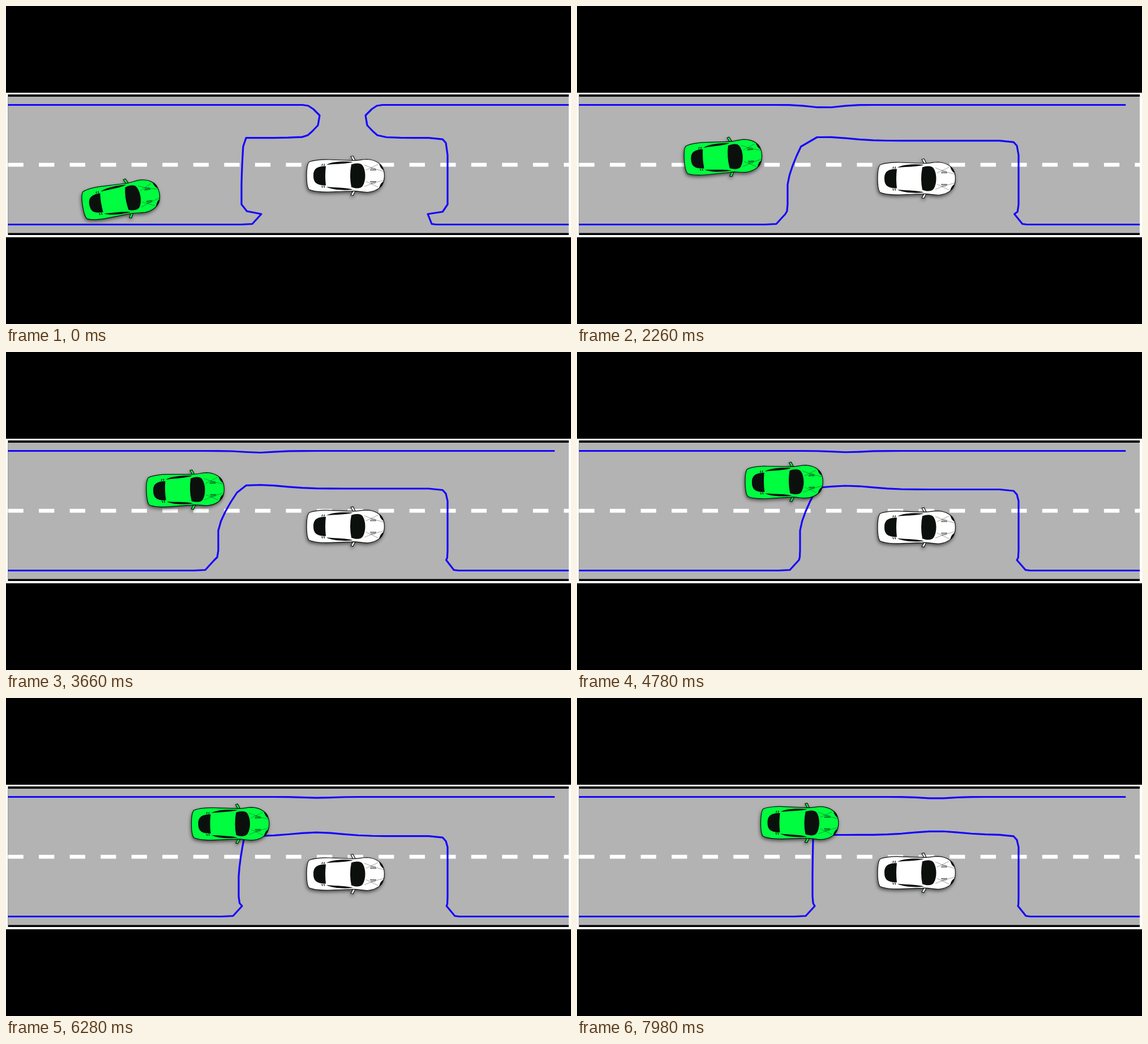
Write an HTML page with a canvas that moves like this. It is 998 px wide and 561 px high and loops after 8000 ms.

```html
<!DOCTYPE html>
<html lang="en">
<head>
<meta charset="utf-8">
<title>Overtaking</title>
<style>
html, body { margin: 0; width: 100%; height: 100%; overflow: hidden; background: #000; }
canvas { display: block; }
</style>
</head>
<body>
<canvas id="stage" width="998" height="561"></canvas>
<script>
const ctx = document.getElementById('stage').getContext('2d');
const LOOP = 8000;
const BLUE = '#1606fb';
const KEYS = [0, 26, 49, 79, 103, 134, 171];
const ROAD_TOP = 174.5, ROAD_BOTTOM = 385.5, ROAD_LEFT = 3.5, ROAD_RIGHT = 994;

// Smooth curve through a few values at uneven steps.
function curve(values, steps = KEYS) {
  const last = steps.length - 1;
  const slope = i => {
    const a = Math.max(i - 1, 0), b = Math.min(i + 1, last);
    return (values[b] - values[a]) / (steps[b] - steps[a]);
  };
  return n => {
    if (n >= steps[last]) return values[last];
    const i = steps.findIndex(s => s > n) - 1;
    const h = steps[i + 1] - steps[i], u = (n - steps[i]) / h, v = 1 - u;
    return v * v * (1 + 2 * u) * values[i] + u * u * (3 - 2 * u) * values[i + 1]
      + h * u * v * (v * slope(i) - u * slope(i + 1));
  };
}
const bell = (x, center, width) => Math.exp(-(((x - center) / width) ** 2));

const greenX = curve([203.5, 211.5, 258.3, 317, 366, 396.5, 402, 393.5], [0, 26, 49, 79, 103, 134, 152, 171]);
const greenY = curve([341.5, 296.7, 267, 243.3, 229.4, 222, 220.3]);
const greenAngle = n => 1.5 - 10.5 * Math.exp(-n / 75);
const whiteY = curve([299.5, 301.5, 304.5, 307.8, 309.3, 310.5, 308.3]);

// The boundary opens in a gap above the white car, which closes and leaves a bump.
const MERGE = 38;
const gapWidth = n => 81 * (1 - (n / MERGE) ** 1.55);
const gapX = curve([594.5, 489, 437, 447, 477, 549, 635]);
const leftFoot = curve([435, 382, 352, 352, 376, 401, 404]);
const leftWall = curve([416, 398, 372, 375, 394, 411, 416]);
const rightElbow = curve([745, 733, 771, 777, 779], [0, 26, 46, 103, 171]);
const RIGHT_WALL = 780;

function leftSide(n) {
  const foot = leftFoot(n), wall = leftWall(n), elbow = foot + 16;
  const lean = 33 * bell(n, 78, 50);
  const points = [[ROAD_LEFT, ROAD_BOTTOM], [foot - 20, ROAD_BOTTOM], [foot, 384.5], [elbow, 367],
    [wall + 0.27 * (elbow - wall), 362], [wall, 350]];
  for (let y = 315; y > 246; y -= 16.75) points.push([wall + lean * ((315 - y) / 67) ** 1.4, y]);
  return points;
}

function crest(n) {
  const points = [];
  for (let i = 0; i <= 14; i++) {
    const x = 424 + 24.8 * i;
    points.push([x, whiteY(n) - 66.8 - 6.5 * bell(x, gapX(n), 60) + (i === 14 ? 2.5 : 0)]);
  }
  return points;
}

function rightSide(n) {
  const elbow = rightElbow(n), foot = 793 - 41 * Math.exp(-n / 26);
  return [[777, whiteY(n) - 58], [RIGHT_WALL, 263], [RIGHT_WALL, 350],
    [RIGHT_WALL + 0.25 * (elbow - RIGHT_WALL), 363], [elbow, 367], [foot, 384.5],
    [foot + 8, ROAD_BOTTOM], [ROAD_RIGHT, ROAD_BOTTOM]];
}

// Rounded end beside the gap, from top to bottom; side is -1 on the left.
function gapEnd(n, side) {
  const tip = gapX(n) + side * gapWidth(n) / 2;
  const stretch = 1 + n * (side < 0 ? 0.025 : 0.045);
  return [[30, ROAD_TOP], [20, 176], [11, 182], [0, 193], [3, 210.5], [13, 221], [21, 228]]
    .map(([dx, y]) => [tip + side * dx * (y < 193 ? stretch : 1), y]);
}

function polyline(points) {
  ctx.beginPath();
  points.forEach(([x, y]) => ctx.lineTo(x, y));
  ctx.stroke();
}

function drawBoundary(n) {
  ctx.strokeStyle = BLUE;
  ctx.lineWidth = 3.2;
  ctx.lineJoin = 'round';
  if (n < MERGE) {
    const a = gapEnd(n, -1), b = gapEnd(n, 1);
    polyline([...leftSide(n), ...crest(n).filter(p => p[0] < a[6][0] - 4), ...a.reverse(), [ROAD_LEFT, ROAD_TOP]]);
    polyline([[ROAD_RIGHT, ROAD_TOP], ...b, ...crest(n).filter(p => p[0] > b[6][0] + 4), ...rightSide(n)]);
  } else {
    const depth = 1.4 + (311 - whiteY(n)) * 0.5 + 6 * Math.exp((MERGE - n) / 3);
    const top = [];
    for (let x = ROAD_LEFT; x <= ROAD_RIGHT; x += 24.7625) top.push([x, ROAD_TOP + depth * bell(x, gapX(n), 35)]);
    polyline(top);
    polyline([...leftSide(n), ...crest(n), ...rightSide(n)]);
  }
}

const body = new Path2D(`M-69 0C-69 -12 -68 -20 -65 -24C-57 -28 -40 -29 -30 -28.5L10 -27
  C21 -26 27 -29 38 -29C52 -28 60 -23 65 -15C69.5 -6 69.5 6 65 15C60 23 52 28 38 29
  C27 29 21 26 10 27L-30 28.5C-40 29 -57 28 -65 24C-68 20 -69 12 -69 0Z`);
const rearWindow = new Path2D('M-35 -17C-51 -17 -57 -12 -57 0S-51 17 -35 17Q-37 0 -35 -17Z');
const windshield = new Path2D('M10 -20C18 -23 27 -23 30 -18C36 -9 36 9 30 18C27 23 18 23 10 20Q6 0 10 -20Z');
// Parts of one side, mirrored for the other.
const mirror = new Path2D('M13 -27L9 -34L13 -35L17 -27Z');
const sideWindow = new Path2D('M-34 -19.5C-24 -25 -4 -26 13 -24.5C4 -21 -16 -21 -34 -19.5Z');
const headlight = new Path2D('M59 -22Q66 -18 66.5 -10Q61 -13 59 -22Z');
const rearVents = new Path2D('M-42 -17.5L-41 -21M-38.5 -17.5L-37.5 -21');
const hoodLines = new Path2D('M33 -19Q50 -11 67 -8M36 -10L57 -20');
const hoodVents = new Path2D('M44 -10L46 -14M46.5 -10L48.5 -14M49 -10L51 -14M51.5 -10L53 -13M43 -10H54');

function bothSides(draw) {
  for (let side = 0; side < 2; side++) {
    ctx.scale(1, -1);
    draw();
  }
}

function drawCar(x, y, angle, color) {
  ctx.save();
  ctx.translate(x, y);
  ctx.rotate(angle * Math.PI / 180);
  ctx.fillStyle = color;
  ctx.strokeStyle = '#111';
  ctx.lineWidth = 1.2;
  ctx.shadowColor = 'rgba(0,0,0,.65)';
  ctx.shadowBlur = 6;
  ctx.shadowOffsetX = -1;
  ctx.shadowOffsetY = 3;
  bothSides(() => ctx.fill(mirror));
  ctx.fill(body);
  ctx.shadowColor = 'transparent';
  bothSides(() => {
    ctx.fill(mirror);
    ctx.stroke(mirror);
  });
  ctx.fill(body);
  ctx.stroke(body);

  ctx.fillStyle = '#0c100d';
  ctx.fill(rearWindow);
  ctx.fill(windshield);
  bothSides(() => {
    ctx.fill(sideWindow);
    ctx.fill(headlight);
    ctx.lineWidth = 1.3;
    ctx.stroke(rearVents);
    ctx.lineWidth = 0.4;
    ctx.stroke(hoodLines);
    ctx.lineWidth = 0.7;
    ctx.stroke(hoodVents);
  });
  ctx.restore();
}

function drawRoad() {
  const box = (color, x, y, w, h) => { ctx.fillStyle = color; ctx.fillRect(x, y, w, h); };
  const width = ROAD_RIGHT - ROAD_LEFT;
  box('#000', 0, 0, 998, 561);
  box('#fff', 0, 153, 998, 255);
  box('#000', ROAD_LEFT, 156, width, 248);
  box('#b3b3b3', ROAD_LEFT, 160, width, 240.5);
  for (let x = ROAD_LEFT; x < ROAD_RIGHT; x += 54.55) {
    box('#fff', x, 276.7, Math.min(27.3, ROAD_RIGHT - x), 6.8);
  }
}

// Pictures advance evenly but are held for 100, 20 and 20 ms in turn.
function stepAt(ms) {
  const cycle = Math.floor((ms - 20) / 140), rest = ms - 20 - cycle * 140;
  return cycle * 3 + 1 + (rest >= 100) + (rest >= 120);
}

function render() {
  const n = stepAt(performance.now() % LOOP);
  drawRoad();
  drawBoundary(n);
  drawCar(600, whiteY(n), 0, '#fff');
  drawCar(greenX(n), greenY(n), greenAngle(n), '#00fd40');
  requestAnimationFrame(render);
}
render();
</script>
</body>
</html>
```
